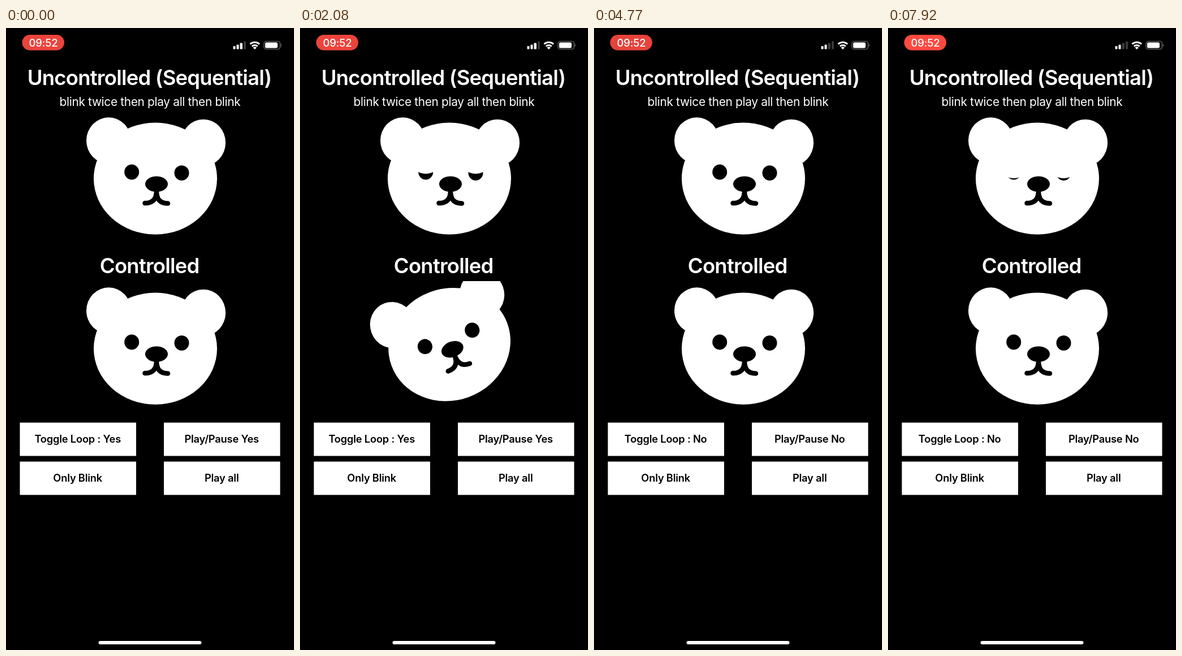
Write an HTML page that moves like this. It is 509 px wide and 1101 px high and loops after 8000 ms.

```html
<!DOCTYPE html>
<html lang="en">
<head>
<meta charset="utf-8">
<title>Bear player</title>
<style>
  html, body { margin: 0; width: 100%; height: 100%; overflow: hidden; background: #000; }
  svg { display: block; width: 509px; height: 1101px; }
  text { font-family: Inter, sans-serif; text-anchor: middle; fill: #fff; }
  .title { font-size: 36.5px; font-weight: 600; letter-spacing: -.8px; }
  .sub { font-size: 20.9px; letter-spacing: -.35px; }
  .time { font-size: 18.6px; font-weight: 500; letter-spacing: -.2px; }
  .button text { font-size: 18.3px; font-weight: 600; letter-spacing: -.2px; fill: #000; }
</style>
</head>
<body>
<svg viewBox="0 0 509 1101" fill="#fff">
  <defs>
    <clipPath id="view"><rect y="147" width="509" height="245.7"/></clipPath>
    <g id="face">
      <ellipse cx="264" cy="266.5" rx="109" ry="99"/>
      <ellipse cx="181.5" cy="199.3" rx="39.5" ry="41"/>
      <ellipse cx="348.8" cy="203" rx="39.3" ry="41.3"/>
      <g fill="#000">
        <ellipse cx="222.2" cy="255" rx="13" ry="13.4"/>
        <ellipse cx="310.5" cy="256.6" rx="13" ry="13.4"/>
        <ellipse cx="266" cy="276.3" rx="20" ry="13.8"/>
      </g>
      <path d="M266 288C266 302 260 310 245.500 310M266 288C266 303 272 310.500 286 310.500"
        fill="none" stroke="#000" stroke-width="8.5" stroke-linecap="round"/>
    </g>
  </defs>
  <rect width="509" height="1101" fill="#000"/>

  <rect id="pill" x="28.500" y="12" width="74.500" height="27.500" rx="13.750"/>
  <text class="time" x="66" y="32.800">09:52</text>
  <g id="signal">
    <rect x="401.500" y="32" width="4" height="5.500" rx="1"/>
    <rect x="407.500" y="29.500" width="4" height="8" rx="1"/>
    <rect x="413.500" y="26.500" width="4.500" height="11" rx="1"/>
    <rect x="420" y="23.500" width="4" height="14" rx="1" fill="#3a3a3c"/>
  </g>
  <g fill="none" stroke="#fff" stroke-width="3">
    <path d="M431.500 28.500a12 12 0 0 1 16.500 0M434.800 32.300a7.500 7.500 0 0 1 9.900 0"/>
  </g>
  <path d="M439.750 38l-3.100-3.200a4.500 4.500 0 0 1 6.200 0z"/>
  <rect x="456" y="23.500" width="28.500" height="14" rx="4" fill="none" stroke="#777" stroke-width="1.200"/>
  <rect x="458" y="25.500" width="22" height="10" rx="2.300"/>
  <path d="M486.200 28q2 2.500 0 5z" fill="#888"/>

  <text class="title" x="253.500" y="100.500">Uncontrolled (Sequential)</text>
  <text class="sub" x="254.500" y="138">blink twice then play all then blink</text>
  <text class="title" x="253.700" y="434">Controlled</text>
  <g id="bears"></g>
  <g id="buttons"></g>
  <rect x="163.500" y="1085" width="182" height="6" rx="3"/>
</svg>
<script>
const $ = id => document.getElementById(id);
const clamp = x => Math.min(1, Math.max(0, x));
const ramp = (t, from, to) => clamp((t - from) / (to - from));

const LOOP = 8000, SPIN_AT = 304, SPIN = 800, ALL = 1976, TAIL_BLINK = 1110, BLINK = 620;
const CLOSE = 421;

function makeBear(y) {
  $('bears').insertAdjacentHTML('beforeend',
    `<g transform="translate(0 ${y})" clip-path="url(#view)"><g>
      <use href="#face"/><circle cx="222.2" r="28"/><circle cx="310.5" r="28"/></g></g>`);
  const body = $('bears').lastElementChild.firstElementChild;
  return { body, lids: body.querySelectorAll('circle') };
}

function makeButton(x, y, label) {
  $('buttons').insertAdjacentHTML('beforeend',
    `<g class="button"><rect x="${x}" y="${y}" width="205.5" height="59"/>
      <text x="${x + 102.2}" y="${y + 35.7}">${label}</text></g>`);
  const [rect, text] = $('buttons').lastElementChild.children;
  return { rect, text };
}

const top1 = makeBear(0), bottom = makeBear(301);
const toggle = makeButton(24.5, 698.5, 'Toggle Loop : Yes');
const play = makeButton(279, 698.5, 'Play/Pause Yes');
makeButton(24.5, 767.5, 'Only Blink');
makeButton(279, 767.5, 'Play all');

// Each bear plays the full clip (hop, spin, blink) or the blink alone from given start times.
function poseBear(bear, t, fullStarts, blinkStarts) {
  const start = fullStarts.find(s => t >= s && t < s + ALL);
  const local = start === undefined ? 0 : t - start;
  const angle = -360 * ramp(local, SPIN_AT, SPIN_AT + SPIN);
  const land = SPIN_AT + SPIN;
  const hop = ramp(local, SPIN_AT, SPIN_AT + 80) - ramp(local, land, land + 80);
  bear.body.setAttribute('transform',
    `translate(${-.8 * hop} ${-12.3 * hop}) rotate(${angle} 263.4 264.8)`);

  const blinks = blinkStarts.concat(fullStarts.map(s => s + TAIL_BLINK));
  const began = blinks.find(s => t >= s && t < s + BLINK);
  const b = began === undefined ? 0 : t - began;
  const closed = ramp(b, 0, CLOSE) - ramp(b, CLOSE, BLINK);
  for (const lid of bear.lids) lid.setAttribute('cy', 241 + 27 * closed - 28);
}

function press(button, t, times) {
  const k = Math.max(...times.map(([down, up]) => ramp(t, down, down + 100) - ramp(t, up, up + 180)));
  const shade = c => Math.round(255 - (255 - c) * k);
  button.rect.setAttribute('fill', `rgb(${shade(193)},${shade(189)},${shade(193)})`);
}

function setText(button, s) {
  if (button.text.textContent !== s) button.text.textContent = s;
}

function draw(t) {
  poseBear(top1, t, [704, 4800], [0, 2650, 3384, 4100, 6826, 7530]);
  poseBear(bottom, t, [-244, 1732, 5486], []);

  press(toggle, t, [[4240, 4540]]);
  press(play, t, [[2380, 2740], [5290, 5560]]);
  setText(toggle, 'Toggle Loop : ' + (t < 4480 ? 'Yes' : 'No'));
  setText(play, 'Play/Pause ' + (t < 2560 || (t >= 5486 && t < 7440) ? 'Yes' : 'No'));

  const glow = clamp(.5 - 1.4 * Math.cos((t - 370) / 2100 * 2 * Math.PI) / 2);
  $('pill').setAttribute('fill', `rgb(${230 + 25 * glow},${67 + 6 * glow},${59 + 5 * glow})`);
  $('signal').children[2].setAttribute('fill', t < 3850 ? '#fff' : '#3a3a3c');
}

const origin = performance.now();
function tick() {
  draw((performance.now() - origin) % LOOP);
  requestAnimationFrame(tick);
}
tick();
</script>
</body>
</html>
```
